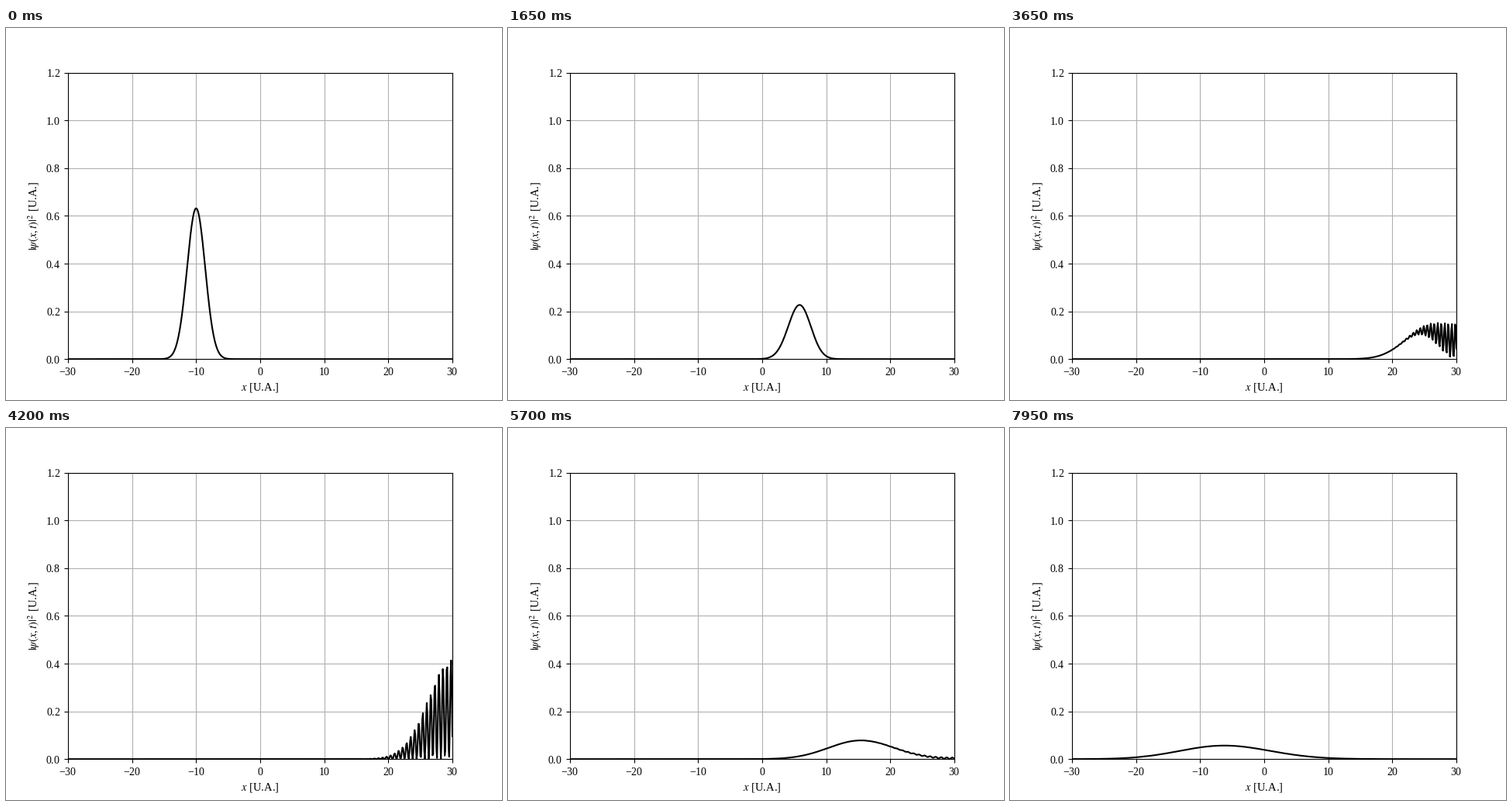
A matplotlib script for the animation above (8000 ms loop, 640x480 px).

```python
import numpy as np
import matplotlib.pyplot as plt
from matplotlib.animation import FuncAnimation

plt.rcParams.update({
    "font.family": "Liberation Serif",
    "font.size": 10,
    "mathtext.fontset": "stix",
    "axes.formatter.use_mathtext": True,
})

FRAMES, INTERVAL = 160, 50
N, L = 601, 30.0          # grid points, half width of the box
DT = 0.1                  # time units per frame
X0, K0, SIGMA = -10.0, 5.0, 1.0

x = np.linspace(-L, L, N)
dx = x[1] - x[0]

# Gaussian packet moving to the right
psi0 = (2 * np.pi * SIGMA**2) ** -0.25 * np.exp(
    -(x - X0) ** 2 / (4 * SIGMA**2) + 1j * K0 * x)

# Eigenmodes of the finite-difference Hamiltonian with hard walls
m = np.arange(1, N + 1)
modes = np.sqrt(2 / (N + 1)) * np.sin(np.pi * np.outer(m, m) / (N + 1))
energy = (1 - np.cos(np.pi * m / (N + 1))) / dx**2
coef = modes @ psi0


def density(t):
    return np.abs(modes @ (coef * np.exp(-1j * energy * t))) ** 2


fig, ax = plt.subplots(figsize=(6.4, 4.8), dpi=100)
ax.set_xlim(-L, L)
ax.set_ylim(0, 1.2)
ax.grid(True)
ax.set_xlabel(r"$x$ [U.A.]", fontsize=10.5)
ax.set_ylabel(r"$|\psi(x,t)|^2$ [U.A.]", fontsize=10.5)
line, = ax.plot(x, np.abs(psi0), color="black", lw=1.5)


def update(i):
    # the opening frame shows the amplitude, the rest its square
    line.set_ydata(density(i * DT) if i else np.abs(psi0))
    return line,


anim = FuncAnimation(fig, update, frames=FRAMES, interval=INTERVAL,
                     repeat=True, repeat_delay=0)
plt.show()
```
